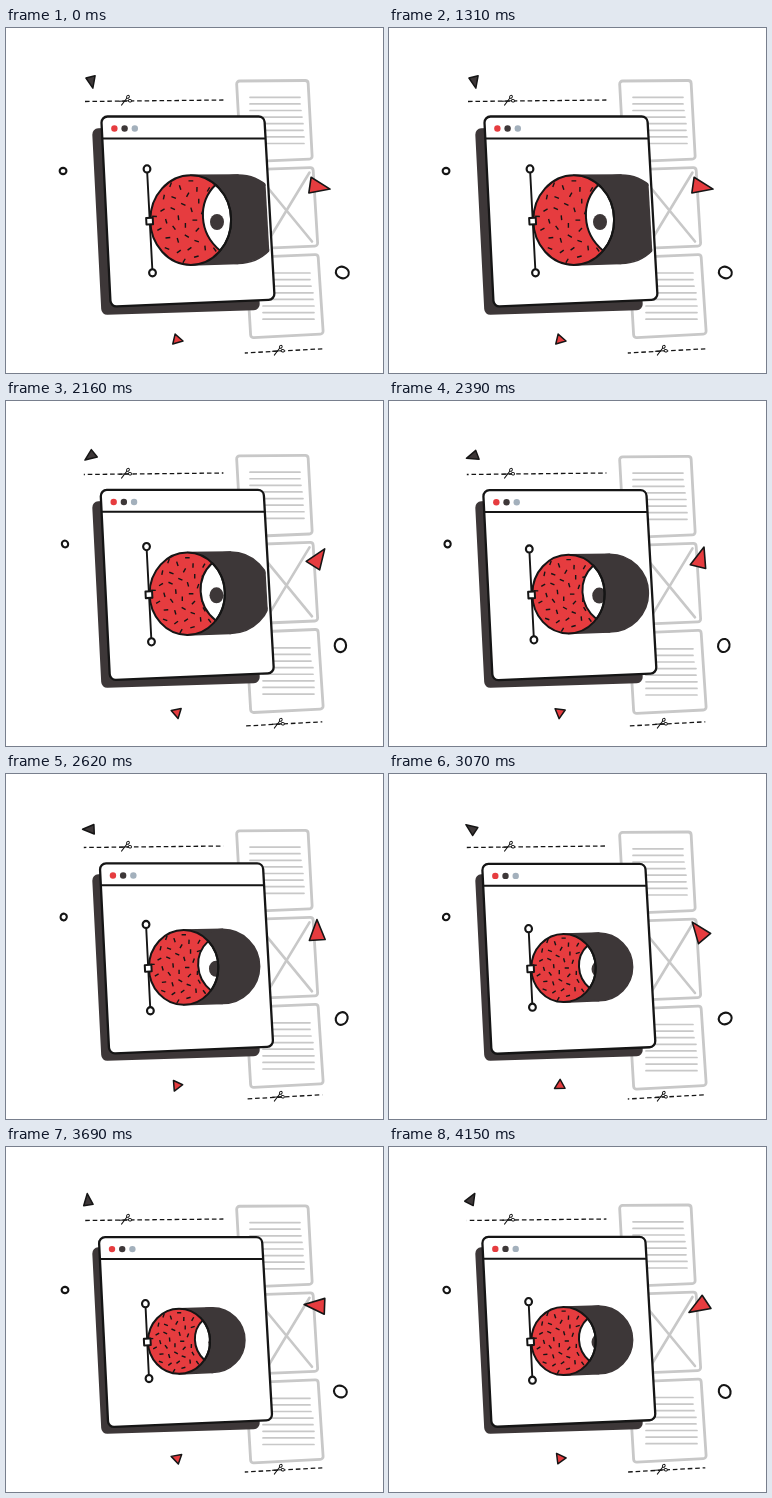
Recreate the animation shown at these times as an HTML page with a canvas. Size 377 by 345 pixels, loop 4.23 s.

```html
<!DOCTYPE html>
<html lang="en">
<head>
<meta charset="utf-8">
<title>Window and shapes</title>
<style>
html, body { margin: 0; width: 100%; height: 100%; overflow: hidden; background: #fff; }
canvas { display: block; width: 377px; height: 345px; }
</style>
</head>
<body>
<canvas id="stage"></canvas>
<script>
const W = 377, H = 345;
const LOOP = 4230, HOLD = 1310, STEP = 76.5, LAST = 37;
const INK = '#151515', DARK = '#3d3738', RED = '#e63c3f', GREY = '#c8c8c8', WHITE = '#fff';

const canvas = document.getElementById('stage');
const ratio = window.devicePixelRatio || 1;
canvas.width = W * ratio;
canvas.height = H * ratio;
const c = canvas.getContext('2d');
c.scale(ratio, ratio);
c.lineJoin = c.lineCap = 'round';

const mix = (a, b, s) => a + (b - a) * s;
const rad = deg => deg * Math.PI / 180;

function paint(fill, stroke, width) {
  if (fill) { c.fillStyle = fill; c.fill(); }
  if (stroke) { c.strokeStyle = stroke; c.lineWidth = width; c.stroke(); }
}

function poly(points, fill, stroke, width) {
  c.beginPath();
  points.forEach(([x, y]) => c.lineTo(x, y));
  c.closePath();
  paint(fill, stroke, width);
}

function roundPoly(points, r, fill, stroke, width) {
  const [a, b] = [points[0], points[points.length - 1]];
  c.beginPath();
  c.moveTo((a[0] + b[0]) / 2, (a[1] + b[1]) / 2);
  points.forEach((p, i) => {
    const q = points[(i + 1) % points.length];
    c.arcTo(p[0], p[1], q[0], q[1], r);
  });
  c.closePath();
  paint(fill, stroke, width);
}

function line(x1, y1, x2, y2, color, width) {
  c.beginPath();
  c.moveTo(x1, y1);
  c.lineTo(x2, y2);
  paint(null, color, width);
}

function oval(x, y, rx, ry, turn, fill, stroke, width) {
  c.beginPath();
  c.ellipse(x, y, rx, ry, rad(turn), 0, Math.PI * 2);
  paint(fill, stroke, width);
}

function at(x, y, turn, draw) {
  c.save();
  c.translate(x, y);
  c.rotate(rad(turn));
  draw();
  c.restore();
}

function textLines(x, y, ends) {
  ends.forEach((end, i) => line(x, y + i * 6.6, end, y + i * 6.6, GREY, 1.7));
}

function pages(s) {
  c.save();
  c.translate(0, mix(6.3, 0, s));
  roundPoly([[230.5, 53], [302, 52.5], [306.3, 131], [235, 134]], 3, WHITE, GREY, 2.8);
  textLines(244, 69.3, [294, 294, 295, 296, 297, 297, 298, 298]);

  roundPoly([[235, 142], [307, 139.5], [311.8, 218], [240, 221]], 3, WHITE, GREY, 2.8);
  line(303.5, 144.5, 262, 213, GREY, 2.6);
  line(255, 151.5, 306, 213.5, GREY, 2.6);

  roundPoly([[240, 229.5], [312, 226.5], [317.3, 306], [244.8, 309.8]], 3, WHITE, GREY, 2.8);
  textLines(257, 245, [304, 304, 305, 307, 307, 308, 308, 308]);
  c.restore();
}

function frameShadow() {
  roundPoly([[86, 100.5], [245, 96], [254, 282], [95.5, 287]], 6, DARK);
}

function browser(s) {
  c.save();
  c.translate(mix(-2.4, 0, s), mix(1.6, 0, s));
  roundPoly([[95.2, 88.5], [258.3, 88.5], [268.7, 271.6], [104.7, 278.6]], 6, WHITE, INK, 2.3);
  line(97, 110.4, 258.5, 110.4, INK, 2);
  [RED, DARK, '#a3b0bc'].forEach((color, i) => oval(108.4 + i * 10.2, 100.5, 3.2, 3.2, 0, color));
  c.restore();
}

function sprinkles(cx, cy, rx, ry) {
  const count = 42;
  c.lineCap = 'butt';
  for (let i = 0; i < count; i++) {
    const d = 0.94 * Math.sqrt((i + 0.5) / count), a = i * 2.39996;
    at(cx + rx * d * Math.cos(a), cy + ry * d * Math.sin(a), (i * i * 37 + i * 53) % 180, () => {
      const half = 1.2 + ry / 38;
      line(-half, 0, half, 0, INK, 1.4);
    });
  }
  c.lineCap = 'round';
}

function tube(s) {
  const cx = mix(173, 184.7, s), cy = mix(194.3, 192.1, s);
  const rx = mix(31, 40.4, s), ry = mix(32.5, 44.8, s);
  const ex = mix(206.5, 232, s), ey = mix(193.2, 191.2, s), er = mix(32.3, 44.2, s);
  const dx = mix(-2.4, 0, s), dy = mix(1.6, 0, s);

  c.save();
  poly([[95, 111], [257, 111], [266, 271], [104, 278]].map(([x, y]) => [x + dx, y + dy]));
  c.clip();
  poly([[cx, cy - ry], [ex, ey - er], [ex, ey + er], [cx, cy + ry]], DARK, DARK, 1.6);
  oval(ex, ey, er, er, 0, DARK, DARK, 1.6);
  c.restore();

  oval(cx, cy, rx, ry, 0, RED);
  c.save();
  oval(cx, cy, rx, ry, 0);
  c.clip();
  sprinkles(cx, cy, rx, ry);
  c.restore();

  // Opening of the tube, closed by the rim of the disc
  const a0 = rad(mix(-40, -52, s)), a1 = rad(mix(35, 43, s));
  const x0 = cx + rx * Math.cos(a0), y0 = cy + ry * Math.sin(a0);
  const x1 = cx + rx * Math.cos(a1), y1 = cy + ry * Math.sin(a1);
  const bend = mix(185.5, 191.5, s), dip = (y1 - y0) * 0.27;
  const opening = () => {
    c.beginPath();
    c.moveTo(x0, y0);
    c.bezierCurveTo(bend, y0 + dip, bend + 1, y1 - dip, x1, y1);
    c.ellipse(cx, cy, rx, ry, 0, a1, a0, true);
    c.closePath();
  };
  opening();
  paint(WHITE);
  c.save();
  c.clip();
  oval(mix(209.3, 211, s), mix(195.2, 194, s), 7, 8, 0, DARK);
  c.restore();
  opening();
  paint(null, INK, 2);
  oval(cx, cy, rx, ry, 0, null, INK, 2);
}

function handle(s) {
  const tx = mix(139.4, 141, s), ty = mix(156.7, 140.9, s);
  const bx = mix(143, 146.5, s), by = mix(231.5, 244.8, s);
  line(tx, ty, bx, by, INK, 1.9);
  oval(tx, ty, 3.4, 3.6, 0, WHITE, INK, 2.1);
  oval(bx, by, 3.4, 3.6, 0, WHITE, INK, 2.1);
  at(mix(141.3, 143.6, s), mix(195, 193.1, s), -3, () => {
    poly([[-3.3, -3.3], [3.3, -3.3], [3.3, 3.3], [-3.3, 3.3]], WHITE, INK, 2);
  });
}

function cutLine(x1, y1, x2, y2, first, k) {
  const period = 7.45, dash = 4.6;
  const y = x => mix(y1, y2, (x - x1) / (x2 - x1));
  c.lineCap = 'butt';
  for (let x = first + k * period / 30 - 2 * period; x < x2; x += period) {
    const a = Math.max(x, x1), b = Math.min(x + dash, x2);
    if (b > a) line(a, y(a), b, y(b), INK, 1.3);
  }
  c.lineCap = 'round';
}

function scissors(x, y) {
  at(x, y, -22, () => {
    line(-5.5, 3, 2.2, -1.6, INK, 1);
    line(-6, -1.4, 2.4, 1.5, INK, 1);
    oval(3.6, -2.3, 1.6, 1.3, -30, WHITE, INK, 0.9);
    oval(4, 2.1, 1.6, 1.3, 30, WHITE, INK, 0.9);
  });
}

function confetti(k) {
  const turn = 6 * k;
  at(83.7, 53.5, turn + 4, () => poly([[-4, -3.2], [5, -6.2], [3.6, 6.4]], DARK, INK, 1.5));
  at(311.2, 158.6, 3 - turn, () => poly([[-6.6, -9], [13, 1.8], [-8, 6.8]], RED, INK, 1.6));
  at(171, 311.5, turn, () => poly([[-1.9, -5.4], [6, 1.5], [-4.2, 4.5]], RED, INK, 1.5));

  const sway = Math.cos(Math.PI * (k - 11) / 10);
  oval(58 + sway, 143, 3.4, 3.1, turn, WHITE, INK, 2.1);
  oval(335.4 - sway, 244.5, 6.6, 5.7, turn + 20, WHITE, INK, 2.1);
}

function draw(k) {
  const s = (1 + Math.cos(Math.PI * k / 30)) / 2;
  c.fillStyle = WHITE;
  c.fillRect(0, 0, W, H);
  pages(s);
  frameShadow();
  browser(s);
  tube(s);
  handle(s);
  cutLine(77.8, 73.5, 217.4, 72, 79, k);
  scissors(119.5, 72.3);
  cutLine(238.8, 325, 316.3, 320.8, 237.4, k);
  scissors(272.3, 322.3);
  confetti(k);
}

const start = performance.now();
function tick() {
  const t = (performance.now() - start) % LOOP;
  draw(Math.max(0, Math.min(LAST, Math.floor((t - HOLD) / STEP))));
  requestAnimationFrame(tick);
}
tick();
</script>
</body>
</html>
```
